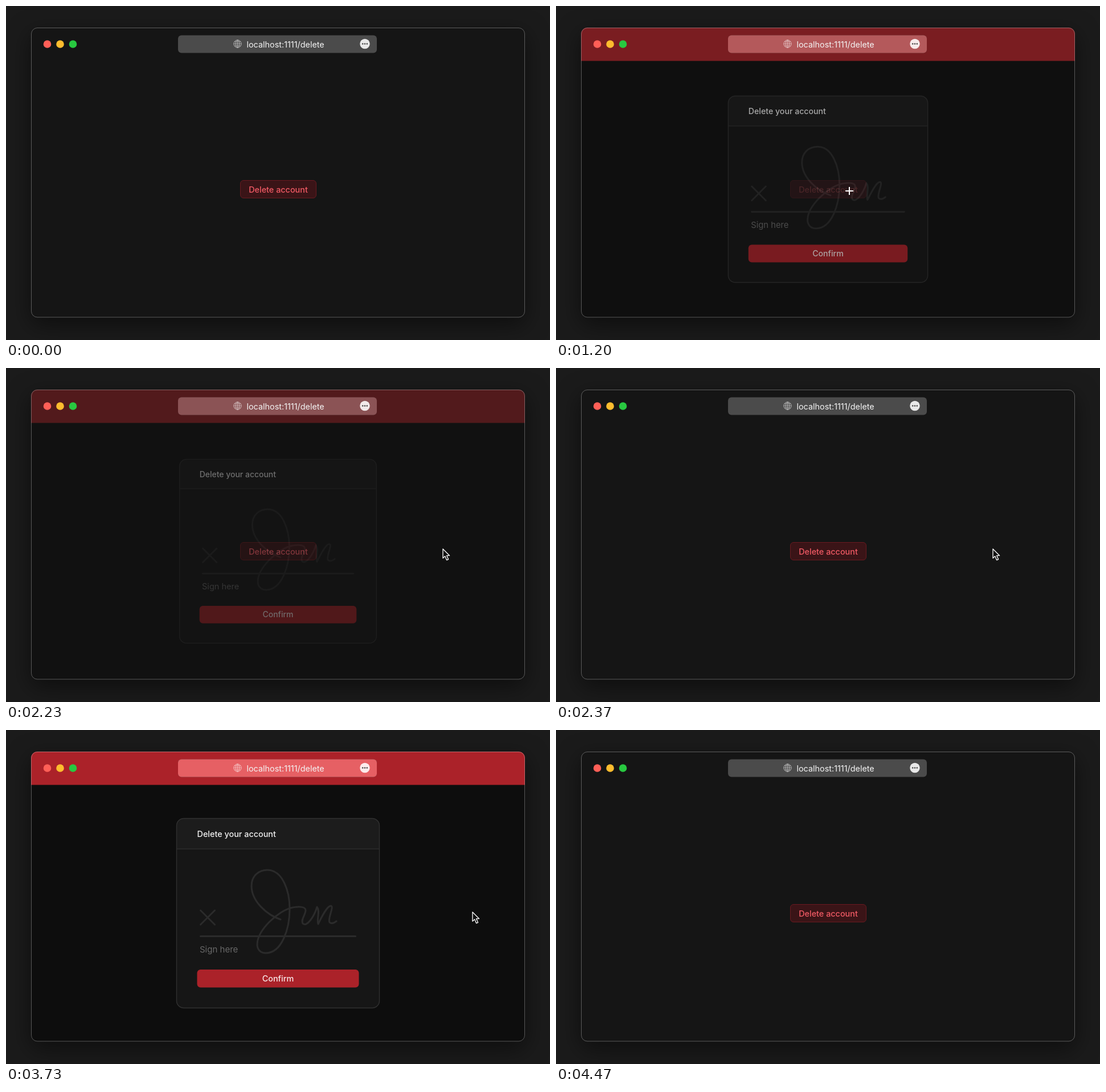
Recreate the animation shown at these times as an HTML page. Size 955 px wide and 587 px high, loop 5200 ms.

```html
<!DOCTYPE html>
<html lang="en">
<head>
<meta charset="utf-8">
<title>Delete account</title>
<style>
  html, body { margin: 0; width: 100%; height: 100%; overflow: hidden; background: #1b1b1b; }
  svg { display: block; width: 955px; height: 587px; font: 500 14.4px Inter, sans-serif; }
  .frame { filter: drop-shadow(0 12px 20px rgba(0, 0, 0, .5)); }
  .ink { fill: none; stroke: #2b2b2b; stroke-width: 3; stroke-linecap: round; stroke-linejoin: round; }
</style>
</head>
<body>
<svg viewBox="0 0 955 587">
  <defs>
    <clipPath id="inside"><rect x="44" y="38" width="867" height="509.500" rx="11"/></clipPath>
  </defs>

  <rect class="frame" x="44" y="38" width="867" height="509.500" rx="11" fill="#151515"/>

  <g id="button">
    <rect x="411.500" y="306.500" width="133" height="31" rx="5.500" fill="#3a1417" stroke="#691a20"/>
    <rect id="hover" x="411.500" y="306.500" width="133" height="31" rx="5.500" fill="#611a22" stroke="#8c222d"/>
    <text x="478" y="327.800" text-anchor="middle" fill="#f05a64">Delete account</text>
  </g>

  <g clip-path="url(#inside)">
    <g id="theme">
      <rect x="44" y="96" width="867" height="452" fill="#000" opacity=".36"/>
      <rect x="44" y="38" width="867" height="58.500" fill="#ab2229"/>
    </g>
  </g>
  <rect x="44.500" y="38.500" width="866" height="508.500" rx="10.500" fill="none" stroke="#fff" stroke-opacity=".3"/>

  <circle cx="72.500" cy="67" r="6.800" fill="#ff5f57"/>
  <circle cx="95" cy="67" r="6.800" fill="#febc2e"/>
  <circle cx="117.500" cy="67" r="6.800" fill="#28c840"/>
  <rect x="302" y="51.500" width="349" height="31" rx="6" fill="#4b4b4b"/>
  <rect id="address" x="302" y="51.500" width="349" height="31" rx="6" fill="#e66064"/>
  <g fill="none" stroke="#fff" stroke-opacity=".55" stroke-width=".9">
    <circle cx="406.500" cy="66.500" r="6.700"/>
    <ellipse cx="406.500" cy="66.500" rx="3.200" ry="6.700"/>
    <path d="M399.800 66.500h13.400M406.500 59.800v13.400M401 63h11M401 70h11"/>
  </g>
  <text x="422.500" y="72.700" fill="#f4f4f4" font-weight="400">localhost:1111/delete</text>
  <circle cx="630" cy="66.500" r="8.700" fill="#fff" fill-opacity=".88"/>
  <g fill="#444">
    <circle cx="626.200" cy="66.500" r="1.300"/>
    <circle cx="630" cy="66.500" r="1.300"/>
    <circle cx="633.800" cy="66.500" r="1.300"/>
  </g>

  <g id="dialog">
    <rect x="299" y="155" width="357" height="334" rx="13" fill="#161616"/>
    <path d="M299 209V168a13 13 0 0 1 13-13H643a13 13 0 0 1 13 13V209Z" fill="#1c1c1c"/>
    <path d="M300 209H655" stroke="#2c2c2c" stroke-width="1.500"/>
    <rect x="299.500" y="155.500" width="356" height="333" rx="12.500" fill="none" stroke="#303030" stroke-width="1.400"/>
    <text x="335.500" y="187.800" fill="#f2f2f2">Delete your account</text>
    <path class="ink" d="M341.500 317L366.500 342M366.500 317L341.500 342"/>
    <path class="ink" stroke-width="2.500" d="M341.500 362.500H613.500"/>
    <path class="ink" d="M482 333C458 325 431 301 431 274C431 256 444 246 459 246C486 246 498 284 498 314
      C498 350 484 392 456 392C446 392 441 385 441 377C441 352 478 317 503 312C514 310 526 310 526 317
      C526 324 517 334 521 340C528 347 541 328 546 311C552 318 545 333 548 341C554 329 563 310 570 309
      C577 309 564 332 568 338C571 341 576 339 580 336"/>
    <text x="340" y="390.800" fill="#686868" font-size="15" font-weight="400">Sign here</text>
    <rect x="335.500" y="421" width="284" height="31.500" rx="6" fill="#ab2229"/>
    <text x="477.500" y="442" text-anchor="middle" fill="#f8e8e8">Confirm</text>
  </g>

  <g id="cursor">
    <path id="arrow" d="M0 0V16.200L3.700 12.800L6.600 19.600L9.600 18.300L6.700 11.700H11.700Z"
      fill="#111" stroke="#fff" stroke-width="1.300" stroke-linejoin="round"/>
    <g id="hand" stroke="#111" stroke-width=".8" stroke-linejoin="round">
      <path fill="#fff" d="M-1.800 2C-2.200 0 .8-.800 1.500 1.200L3 6C3.500 4.800 5.400 4.900 5.700 6.300
        C6.500 5.200 8.200 5.500 8.500 6.800C9.500 6 11 6.700 11.200 8.200C11.700 11 11.500 13 10.200 15V17.700H2.200
        C1.800 15.500-2.200 12.700-4 10.200C-4.800 8.800-3 7.500-1.500 8.700L.4 10Z"/>
      <path fill="none" d="M3.500 11.500V15M6 11.500V15M8.400 11.500V15"/>
    </g>
    <path id="cross" d="M-7 0H7M0-7V7" stroke="#fff" stroke-width="2"/>
  </g>
</svg>

<script>
const LOOP = 5200;
const $ = id => document.getElementById(id);
const clamp = v => Math.min(1, Math.max(0, v));
const ramp = (t, from, to) => clamp((t - from) / (to - from));
const mix = (a, b, p) => a + (b - a) * p;

const linear = p => p;
const easeOut = p => 1 - (1 - p) ** 3;
const easeIn = p => p ** 1.6;
const smooth = p => p * p * (3 - 2 * p);

// Pointer stops: time, x, y, easing used to reach the stop
const stops = [
  [570, 925, 324],
  [930, 494.5, 327, linear],
  [1070, 515, 325, smooth],
  [1700, 515, 325, linear],
  [2150, 767, 318, smooth],
  [2600, 767, 318, linear],
  [3100, 509.5, 327, smooth],
  [3310, 509.5, 327, linear],
  [3700, 819, 320, smooth],
  [4000, 819, 320, linear],
  [4450, 927, 322, easeIn],
];

// Fades between 0 and 1: [show start, show end, hide start, hide end]
const dialogTimes = [[1110, 1400, 2190, 2350], [3310, 3600, 4010, 4200]];
const hoverTimes = [[890, 1040, 1150, 1300], [2980, 3130, 3350, 3500]];

const level = (t, spans, ease) => spans.reduce((sum, [a, b, c, d]) =>
  sum + ease(ramp(t, a, b)) - ease(ramp(t, c, d)), 0);

function pointerAt(t) {
  const i = stops.findIndex(s => s[0] > t);
  if (i < 1) return null;
  const [t0, x0, y0] = stops[i - 1], [t1, x1, y1, ease] = stops[i];
  const p = ease(ramp(t, t0, t1));
  return { x: mix(x0, x1, p), y: mix(y0, y1, p) };
}

const within = ({ x, y }, left, top, right, bottom) =>
  x >= left && x <= right && y >= top && y <= bottom;

function cursorKind(pos, isOpen) {
  if (isOpen) return within(pos, 335, 225, 620, 400) ? 'cross' : 'arrow';
  return within(pos, 411, 306, 545, 338) ? 'hand' : 'arrow';
}

function draw(t) {
  const open = level(t, dialogTimes, easeOut);
  const isOpen = dialogTimes.some(([a, , c]) => t >= a && t < c);
  const scale = mix(0.95, 1, open);
  $('theme').style.opacity = $('address').style.opacity = $('dialog').style.opacity = open;
  $('dialog').setAttribute('transform', `translate(477.5 322) scale(${scale}) translate(-477.5 -322)`);
  $('hover').style.opacity = level(t, hoverTimes, smooth);

  const pos = pointerAt(t);
  $('cursor').style.display = pos ? '' : 'none';
  if (!pos) return;
  $('cursor').setAttribute('transform', `translate(${pos.x} ${pos.y})`);
  const kind = cursorKind(pos, isOpen);
  for (const id of ['arrow', 'hand', 'cross']) $(id).style.display = id === kind ? '' : 'none';
}

const start = performance.now();
function tick() {
  draw((performance.now() - start) % LOOP);
  requestAnimationFrame(tick);
}
tick();
</script>
</body>
</html>
```
